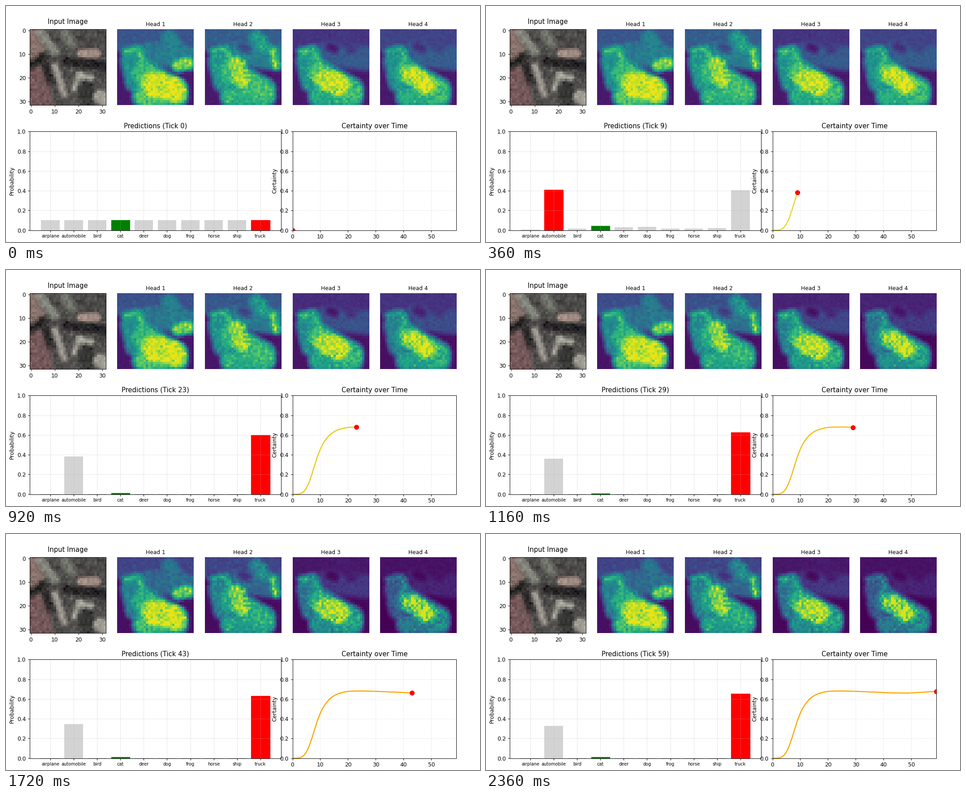
A matplotlib script that plays this animation: 1058x529 px, repeating every 2.4 s.

```python
import numpy as np
import matplotlib.pyplot as plt
from matplotlib.animation import FuncAnimation
from matplotlib.colors import to_rgb

W, H, TICKS, N = 1058, 529, 60, 32
LABELS = ["airplane", "automobile", "bird", "cat", "deer",
          "dog", "frog", "horse", "ship", "truck"]
TRUE = 3

plt.rcParams["font.family"] = "DejaVu Sans"
rng = np.random.default_rng(7)
Y, X = np.mgrid[:N, :N]


def stroke(img, value, x0, y0, x1, y1, r, soft=2.5):
    """Blend one soft round-ended stroke into the image."""
    dx, dy = x1 - x0, y1 - y0
    along = ((X - x0) * dx + (Y - y0) * dy) / (dx * dx + dy * dy)
    along = np.clip(along, 0, 1)
    dist = np.hypot(X - x0 - along * dx, Y - y0 - along * dy)
    cover = np.clip((r - dist) / soft + 0.5, 0, 1)[..., None]
    img += cover * (np.array(value) - img)


def photo():
    img = np.ones((N, N, 3)) * to_rgb("#4e4c4a")
    for color, *shape in [
        ("#86706a", 1, 1, 2, 9, 4), ("#75585a", 2, 20, 4, 31, 5),
        ("#262323", 0, 15, 5, 11, 1.5), ("#2b2828", 6, 14, 8, 21, 1.6),
        ("#868a80", 4, 1, 10, 9, 1.8), ("#72756c", 14, 1, 17, 6, 2),
        ("#a08c84", 21, 10, 27, 10, 2), ("#242224", 15, 13, 31, 15, 1.8),
        ("#a09b94", 10, 15, 14, 27, 1.3), ("#9c9c92", 18, 25, 20, 19, 1.1),
        ("#adada2", 20, 19, 25, 20, 1.2), ("#343533", 23, 25, 24, 29, 3.2),
        ("#a3a097", 29, 28, 31, 29, 3),
    ]:
        stroke(img, to_rgb(color), *shape, soft=2)
    return np.clip(img + rng.normal(0, 0.035, (N, N, 1)), 0, 1)


# strokes common to all heads, and their strength in each head
SHAPES = [(1, 4, 30, 4, 5), (14, 10, 30, 12, 5), (15, 7, 17, 8, 1.8),
          (21, 3, 24, 7, 3), (5, 13, 7, 22, 4), (10, 28, 25, 28, 4),
          (11, 18, 24, 25, 5), (3, 9, 8, 8, 1.5), (9, 10, 11, 16, 1.7)]
LEVELS = [(.27, .42, .38, .46, .5, .72, .7, .68, .68),
          (.3, .42, .2, .56, .53, .65, .68, .66, .66),
          (.15, .28, .07, .17, .52, .62, .68, .7, .7),
          (.2, .3, .12, .2, .5, .62, .68, .62, .66)]
PEAKS = [[(.95, 15, 23, 23, 25, 5), (.84, 25, 15, 29, 14, 2.5)],
         [(.87, 13, 14, 15, 21, 3), (.82, 28, 9, 29, 15, 1.5)],
         [(.92, 13, 21, 19, 23, 4.2)],
         [(.92, 13, 19, 19, 23, 3.8)]]
GAIN = [0.2, 0.3, 0.45, 0.9]


def head_map(levels, peaks):
    img = np.full((N, N, 1), 0.07)
    for level, shape in zip(levels, SHAPES):
        stroke(img, level, *shape)
    for level, *shape in peaks:
        stroke(img, level, *shape)
    return np.clip(img[..., 0] * (1 + rng.normal(0, 0.08, (N, N))), 0.02, 0.97)


MAPS = [head_map(*args) for args in zip(LEVELS, PEAKS)]


def attention(k, t):
    """Contrast sharpens over the middle of the run."""
    s = np.clip((t - 14) / 30, 0, 1)
    return MAPS[k] ** (1 + GAIN[k] * s * s * (3 - 2 * s))


ticks = np.arange(TICKS)
plateau = np.interp(ticks, [0, 12, 16, 20, 25, 43, 49, 59],
                    [.68, .68, .69, .693, .687, .662, .66, .677])
rise = (ticks / 8.5) ** 4.34
CERT = plateau * rise / (1 + rise)

# automobile, cat and truck at the key ticks; the rest fade out together
KEYS = [0, 9, 16, 29, 43, 59]
AUTO = [.1, .407, .41, .36, .347, .327]
CAT = [.1, .045, .012, .008, .012, .012]
TRUCK = [.104, .402, .57, .625, .63, .653]
REST = np.array([.006, .018, .03, .035, .014, .014, .022])


def key_probs(i):
    p = np.empty(10)
    p[[1, 3, 9]] = AUTO[i], CAT[i], TRUCK[i]
    p[[0, 2, 4, 5, 6, 7, 8]] = 0.1 if i == 0 else REST * (1 if i == 1 else 0.05)
    return p


LOGS = np.log([key_probs(i) for i in range(len(KEYS))])


def probs(t):
    c = CERT[t]
    if t < 9:
        u = 9 * np.sqrt(c / CERT[9])
    elif t < 16:
        u = 9 + 7 * (c - CERT[9]) / (CERT[16] - CERT[9])
    else:
        u = t
    p = np.exp([np.interp(u, KEYS, col) for col in LOGS.T])
    return p / p.sum() if 0 < t < 16 else p


fig = plt.figure(figsize=(12, 6), dpi=88.16667)
LEFT, COL, PITCH = 52.9, 170.04, 195.54
TOP, LOW = (52.2, 222.2), (281.3, 502.55)


def panel(first, last, row):
    """Axes over grid columns first..last in a row given in pixels."""
    x = LEFT + PITCH * first
    width = PITCH * (last - first) + COL
    return fig.add_axes([x / W, 1 - row[1] / H, width / W, (row[1] - row[0]) / H])


ax_img = panel(0, 0, TOP)
ax_img.imshow(photo(), aspect="auto")
ax_img.set_title("Input Image", pad=10)

head_ims = []
for k, values in enumerate(MAPS):
    ax = panel(k + 1, k + 1, TOP)
    head_ims.append(ax.imshow(values, cmap="viridis", vmin=0, vmax=1, aspect="auto"))
    ax.set_title(f"Head {k + 1}", fontsize=10)
    ax.axis("off")

ax_bar = panel(0, 2, LOW)
bars = ax_bar.bar(range(10), [0.1] * 10, width=0.8)
ax_bar.set(xlim=(-0.89, 9.89), ylim=(0, 1), ylabel="Probability")
ax_bar.set_xticks(range(10), LABELS, fontsize=8)
ax_bar.grid(True, alpha=0.3)
title = ax_bar.set_title("Predictions (Tick 0)")

ax_cert = panel(3, 4, LOW)
ax_cert.set(xlim=(0, TICKS - 1), ylim=(0, 1), ylabel="Certainty")
ax_cert.set_xlabel("Tick", x=0.277)
ax_cert.set_title("Certainty over Time")
ax_cert.grid(True, linestyle="--", alpha=0.3)
curve, = ax_cert.plot([], [], lw=2)
dot, = ax_cert.plot([], [], "ro", ms=8)

YELLOW, ORANGE = np.array(to_rgb("#e2da24")), np.array(to_rgb("orange"))


def update(t):
    for k, im in enumerate(head_ims):
        im.set_data(attention(k, t))
    p = probs(t)
    best = p.argmax()
    for j, bar in enumerate(bars):
        color = "green" if j == TRUE else "red" if j == best else "lightgray"
        bar.set_height(p[j])
        bar.set_facecolor(color)
        bar.set_edgecolor(color)
        bar.set_linewidth(0 if color == "lightgray" else 1)
    title.set_text(f"Predictions (Tick {t})")
    mix = np.clip((t - 16) / 22, 0, 1)
    curve.set_color(YELLOW + mix * (ORANGE - YELLOW))
    curve.set_data(ticks[:t + 1], CERT[:t + 1])
    dot.set_data([t], [CERT[t]])
    return [*head_ims, *bars, title, curve, dot]


anim = FuncAnimation(fig, update, frames=TICKS, interval=40,
                     init_func=lambda: update(0), repeat=True, repeat_delay=0)
plt.show()
```
